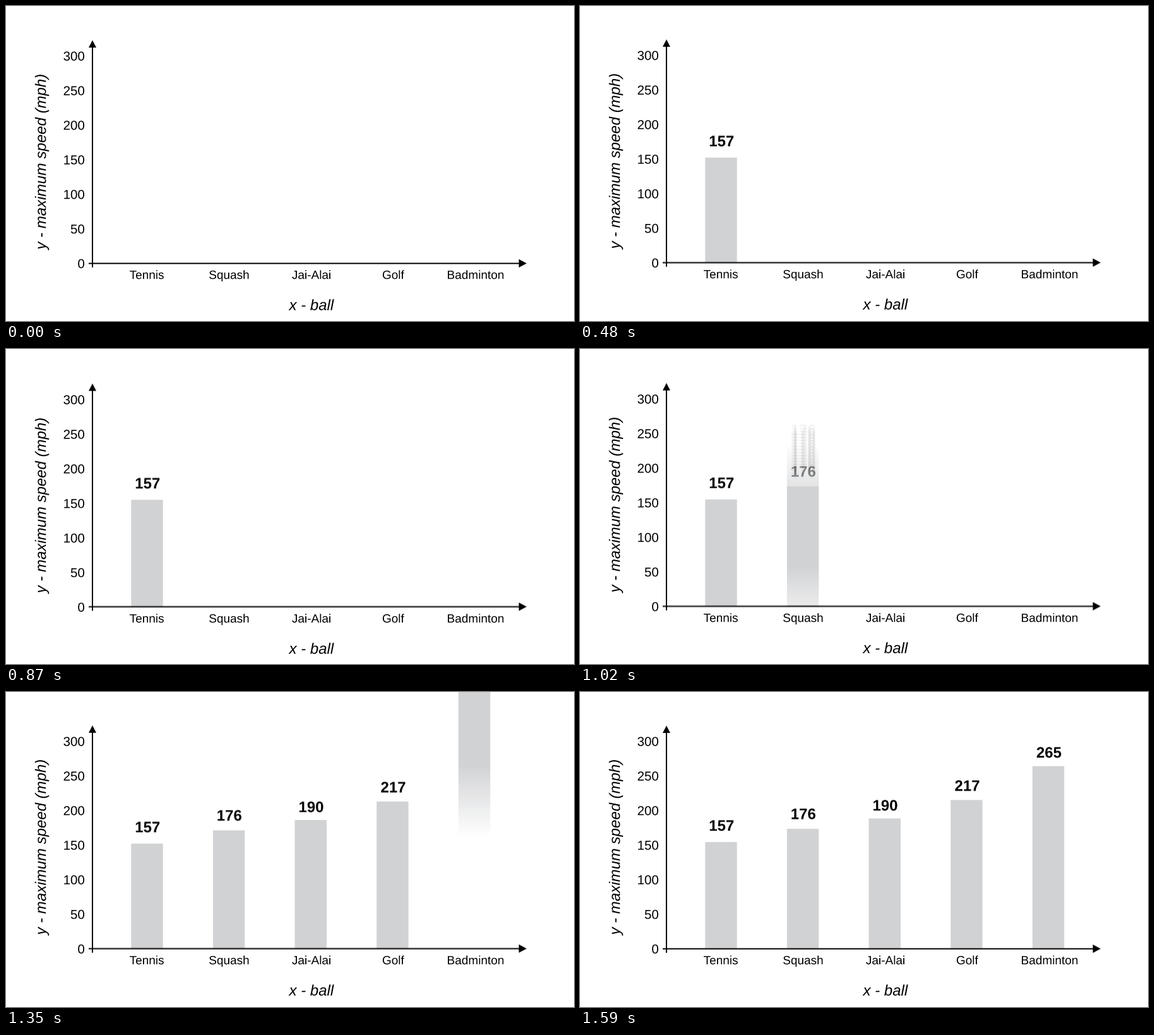
A matplotlib script that plays this animation: 900x500 px, repeating every 6 s.

```python
import numpy as np
import matplotlib.pyplot as plt
from matplotlib.animation import FuncAnimation
from matplotlib.colors import to_rgb
from matplotlib.path import Path
from matplotlib.textpath import TextPath

W, H, DPI = 900, 500, 100
STEP, LOOP = 30, 6000
SHUTTER, SAMPLES = 15, 24           # exposure in ms, sub-frames per exposure
BASE = 408.5                        # y of the horizontal axis at rest
BAR_W, BAR_GAP = 50.4, 129.65
BAR_DROP = 1 - np.array(to_rgb("#d1d2d4"), dtype=np.float32)
DROP, SPEED = 298, 7.67             # fall height in px, speed in px per ms
FIRST, SECOND, PACE = 360, 990, 120  # when the bars start to fall
SETTLED = 1590

starts = [FIRST] + [SECOND + PACE * k for k in range(4)]
impacts = [s + DROP / SPEED for s in starts]


def ring(t, size, period, decay=600):
    """Damped swing since the latest impact."""
    past = [t - hit for hit in impacts if hit <= t]
    if not past:
        return 0
    dt = min(past)
    return size * np.exp(-dt / decay) * np.sin(2 * np.pi * dt / period)


def chart_shake(t):
    return ring(min(t, SETTLED), 1.55, 110)


def bar_shake(t):
    return ring(min(t, SETTLED), 1.9, 335)


def raster(polys, sub=5):
    """Antialiased coverage of polygons: (mask, left, top)."""
    pts = np.vstack(polys)
    x0, y0 = np.floor(pts.min(0)).astype(int)
    x1, y1 = np.ceil(pts.max(0)).astype(int)
    w, h = x1 - x0, y1 - y0
    gx, gy = np.meshgrid(x0 + (np.arange(w * sub) + 0.5) / sub,
                         y0 + (np.arange(h * sub) + 0.5) / sub)
    grid = np.column_stack([gx.ravel(), gy.ravel()])
    inside = np.zeros(len(grid), bool)
    for p in polys:
        inside ^= Path(p).contains_points(grid)
    mask = inside.reshape(h, sub, w, sub).mean((1, 3))
    return mask.astype(np.float32), x0, y0


def text_mask(s, x, y, px, align=0.5, upright=False, **font):
    """Text with its baseline at y, or at x when turned upright."""
    path = TextPath((0, 0), s, size=px,
                    prop=dict(family="Liberation Sans", **font))
    polys = [np.array(p) * (1, -1) for p in path.to_polygons()]
    xs = np.vstack(polys)[:, 0]
    anchor = xs.min() + align * (xs.max() - xs.min())
    polys = [p - (anchor, 0) for p in polys]
    if upright:
        polys = [p[:, ::-1] * (1, -1) for p in polys]
    return raster([p + (x, y) for p in polys])


def polygon(*points):
    return raster([np.array(points + points[:1], float)])


def rect(x0, y0, x1, y1):
    return polygon((x0, y0), (x1, y0), (x1, y1), (x0, y1))


def span(a, b, n):
    i = np.arange(n)
    cover = np.minimum(b, i + 1) - np.maximum(a, i)
    return np.clip(cover, 0, 1).astype(np.float32)


def stamp(img, shape, dy):
    """Ink a black mask onto the image, moved by dy pixels."""
    mask, x, y = shape
    whole = int(np.floor(dy))
    part = np.float32(dy - whole)
    m = (np.pad(mask, ((0, 1), (0, 0))) * (1 - part)
         + np.pad(mask, ((1, 0), (0, 0))) * part)
    y += whole
    if y < 0:
        m, y = m[-y:], 0
    if len(m):
        img[y:y + len(m), x:x + m.shape[1]] *= 1 - m[..., None]


class Bar:
    def __init__(self, i, value, top, label_y):
        left = 198.3 + BAR_GAP * i
        self.x = int(left)
        cols = span(left - self.x, left - self.x + BAR_W, 53)
        self.ink = cols[:, None] * BAR_DROP
        self.impact, self.top = impacts[i], top
        self.label = text_mask(str(value), left + BAR_W / 2 + 1, label_y + 8.5,
                               24, weight="bold")

    def draw(self, img, t, floor):
        dy = min(0, SPEED * (t - self.impact)) + bar_shake(t)
        bottom = min(floor, BASE + 2 + dy)
        if bottom <= 0:
            return
        rows = span(self.top + dy, bottom, H)
        img[:, self.x:self.x + 53] -= rows[:, None, None] * self.ink
        stamp(img, self.label, dy)


# value, top edge, middle of the number
bars = [Bar(i, *spec) for i, spec in enumerate([
    (157, 239, 212.5), (176, 218, 194), (190, 201.5, 180.5),
    (217, 172.2, 149.2), (265, 118.5, 96.5)])]

axes_parts = [
    rect(136, 62, 138, 415),
    rect(131, BASE - 1, 815, BASE + 1),
    polygon((137, 54.3), (143, 66), (131, 66)),
    polygon((825, BASE), (812.5, BASE - 6.7), (812.5, BASE + 6.7))]

words = [text_mask(str(50 * k), 124, 416 - 54.9 * k, 20.5, align=1)
         for k in range(7)]
words += [text_mask(name, 223 + 130.3 * i, 433.2, 19) for i, name in enumerate(
    ["Tennis", "Squash", "Jai-Alai", "Golf", "Badminton"])]
words += [text_mask("x - ball", 483.7, 482.7, 24, style="italic"),
          text_mask("y - maximum speed (mph)", 63.2, 248.5, 24, upright=True,
                    style="italic")]


def picture(t):
    img = np.ones((H, W, 3), np.float32)
    dy = chart_shake(t)
    for bar in bars:
        bar.draw(img, t, BASE + dy)
    for part in axes_parts:
        stamp(img, part, dy)
    return img


def exposure(t):
    if t < FIRST or t >= SETTLED:
        img = picture(t)
    else:
        img = sum(picture(t + SHUTTER * (k + 0.5) / SAMPLES)
                  for k in range(SAMPLES)) / SAMPLES
    for word in words:
        stamp(img, word, round(float(chart_shake(t))))
    return np.clip(img, 0, 1)


fig = plt.figure(figsize=(W / DPI, H / DPI), dpi=DPI, facecolor="white")
ax = fig.add_axes([0, 0, 1, 1])
ax.axis("off")
view = ax.imshow(np.ones((H, W, 3)), aspect="auto", extent=(0, W, H, 0),
                 interpolation="nearest")


def update(n):
    view.set_data(exposure(n * STEP))
    return [view]


anim = FuncAnimation(fig, update, frames=LOOP // STEP, interval=STEP,
                     repeat=True, repeat_delay=0, blit=False)
plt.show()
```
